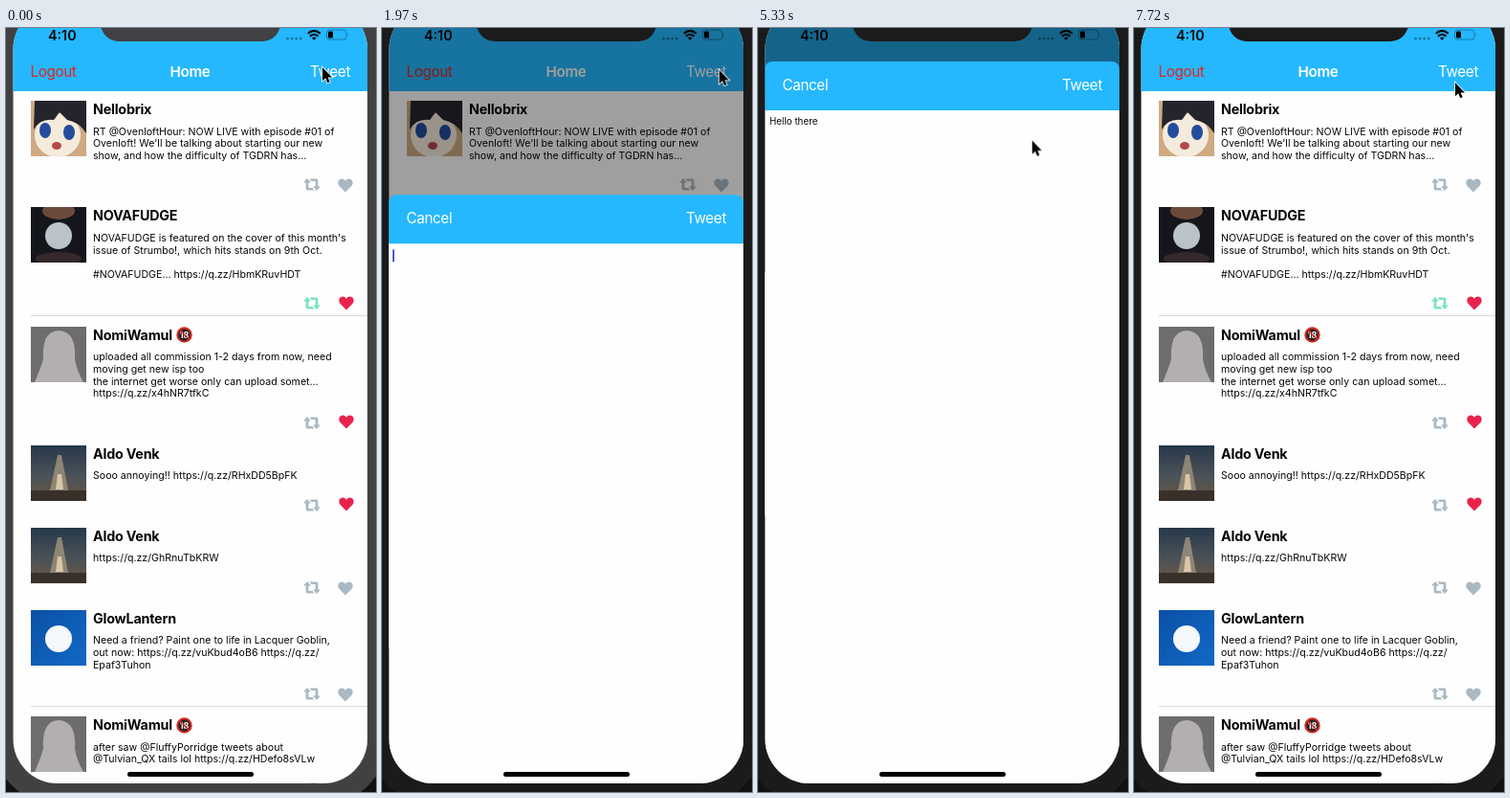
Write an HTML page that moves like this. It is 387 by 798 pixels and loops after 8 s.

```html
<!DOCTYPE html>
<html lang="en">
<head>
<meta charset="utf-8">
<title>Compose flow</title>
<style>
  html, body { margin: 0; width: 100%; height: 100%; overflow: hidden; background: #111; }
  body { position: relative; font-family: Inter, Roboto, sans-serif; color: #060606; }
  div, svg.at { position: absolute; white-space: nowrap; }
  .loop { animation: 8s ease infinite; }
  .hard { animation-timing-function: step-end; }

  .bezel { background: #414143; animation-name: focus; }
  .body { inset: -60px -12px -13px -14px; border-radius: 68px; }
  .notch { left: 99px; top: -30px; width: 188px; height: 43.5px; border-radius: 19px; }
  .screen { inset: 0; background: #fefefe; clip-path: inset(-24px 9px 9px 7.5px round 46px); }
  .indicator { left: 127px; top: 777px; width: 132px; height: 4.5px; border-radius: 3px; background: #000; }

  .bar { left: 7px; right: 9px; background: #25b8ff; }
  .nav { top: 0; height: 66px; }
  .label { font-size: 15.2px; line-height: 20px; letter-spacing: -.35px; color: #fff; }
  .left { left: 25.5px; }
  .right { right: 27px; }
  .title { left: 0; width: 385px; text-align: center; font-weight: 600; }
  .time { left: 44px; top: -2px; font: 600 14.3px/20px Inter, Roboto, sans-serif; }

  .feed { inset: 66px 9px auto 0; }
  .row { left: 0; right: 0; }
  .avatar { left: 25.5px; top: 10px; width: 58px; height: 58px; }
  .name { left: 91px; top: 10px; font-size: 14.3px; line-height: 18px; font-weight: 700; letter-spacing: -.2px; }
  .name svg { width: 17px; height: 17px; vertical-align: -3.5px; margin-left: 1px; }
  .text { left: 91px; top: 36.6px; font-size: 10.6px; line-height: 12.7px; white-space: pre; }
  .share { left: 311px; bottom: 7px; width: 18px; height: 13px; fill: #aab8c2; }
  .heart { left: 347px; bottom: 5px; width: 16px; height: 15px; fill: #aab8c2; }
  .share.on { fill: #7ce2bb; }
  .heart.on { left: 348px; bottom: 6.5px; fill: #e9224c; }
  .line { left: 25.5px; right: 0; bottom: 0; height: 1px; background: #d9d9dc; animation-name: line; }
  .line.faint { background: #ebebec; animation-name: faint; }

  .dim { inset: 0; background: #000; opacity: 0; animation-name: dim; }
  .sheet { inset: 0; transform: translateY(763px); animation-name: sheet; }
  .paper { inset: 60px 9px 0 7px; background: #fefefe; }
  .head { top: 35px; height: 50.5px; border-radius: 8px 8px 0 0; }
  .send { animation-name: press; }
  .typed { left: 12px; top: 91px; font-size: 9.8px; line-height: 14px; white-space: pre; }
  .caret { left: 11px; top: 91.5px; width: 1.8px; height: 13.5px; background: #4162d6; animation-name: blink; }
  .cursor { left: 0; top: 0; width: 14px; height: 20px; overflow: visible; animation: cursor 8s linear infinite; }

  @keyframes focus { 0% { background: #414143 } 14.4%, 100% { background: #1b1b1b } }
  @keyframes sheet {
    0%, 20.06% { transform: translateY(763px) }
    28.94%, 74.5% { transform: none }
    81.62%, 100% { transform: translateY(763px) }
  }
  @keyframes dim { 0%, 20.06% { opacity: 0 } 28.94%, 74.5% { opacity: .46 } 81.62%, 100% { opacity: 0 } }
  @keyframes press { 0% { opacity: 1 } 73.1% { opacity: .75 } 82%, 100% { opacity: 1 } }
  @keyframes blink {
    0% { opacity: 1 } 30.1% { opacity: 0 } 35.7% { opacity: 1 }
    63.2% { opacity: 0 } 69.8% { opacity: 1 } 74.4%, 100% { opacity: 0 }
  }
  @keyframes line { 0% { opacity: 1 } 74.5% { opacity: 0 } 94.3%, 100% { opacity: 1 } }
  @keyframes faint {
    0% { opacity: 0 }
    6.2% { opacity: 1; clip-path: inset(0 82px 0 150px) }
    19.1% { opacity: 1; clip-path: inset(0) }
    74.5%, 100% { opacity: 0 }
  }
  @keyframes cursor {
    0%, .5% { transform: translate(331px, 41px) }
    3% { transform: translate(236px, 170px) }
    5.6% { transform: translate(146px, 337px) }
    8.5% { transform: translate(215px, 190px) }
    11.1%, 12.1% { transform: translate(287px, 78px) }
    16.6%, 19% { transform: translate(341px, 42px) }
    22%, 24% { transform: translate(359px, 38px) }
    29% { transform: translate(310px, 84px) }
    31.2%, 62.5% { transform: translate(251px, 139px) }
    65.2% { transform: translate(258px, 142px) }
    70% { transform: translate(354px, 60px) }
    73.1%, 94% { transform: translate(338px, 57px) }
    96.4%, 100% { transform: translate(336px, 57px) }
  }
</style>
</head>
<body>
<div class="bezel body loop hard"></div>
<div class="screen">
  <div class="feed" id="feed"></div>
  <div class="bar nav"></div>
  <div class="label left" style="top:36px;color:#e8231c">Logout</div>
  <div class="label title" style="top:36px">Home</div>
  <div class="label right" style="top:36px">Tweet</div>
  <div class="time">4:10</div>
  <svg class="at" style="left:290px;top:0" width="72" height="16">
    <g fill="#1879a8"><circle cx="4.5" cy="11" r="1.5"/><circle cx="9" cy="11" r="1.5"/><circle cx="13.6" cy="11" r="1.5"/><circle cx="18.2" cy="11" r="1.5"/></g>
    <g fill="none" stroke="#060606" stroke-width="2.1"><path d="M25.7 5.8Q32.2 0 38.7 5.8M28 8.6Q32.2 4.9 36.4 8.6"/></g>
    <path d="M30 10.4Q32.2 8.7 34.4 10.4L32.2 12.7Z"/>
    <rect x="45.5" y="2" width="20.5" height="10" rx="3" fill="none" stroke="#1879a8"/>
    <path d="M67.3 5.3q1.6 1.7 0 3.4z" fill="#1879a8"/>
    <rect x="47" y="3.5" width="5" height="7" rx="1.3"/>
  </svg>
  <div class="dim loop"></div>
  <div class="sheet loop">
    <div class="paper"></div>
    <div class="bar head"></div>
    <div class="label left" style="top:50px">Cancel</div>
    <div class="label right send loop hard" style="top:50px">Tweet</div>
    <div class="typed" id="typed"></div>
    <div id="caretTrack"><div class="caret loop hard"></div></div>
  </div>
  <div class="indicator"></div>
</div>
<div class="bezel notch loop hard"></div>
<svg class="cursor at" viewBox="0 0 14 20">
  <path d="M0 0V14.2L3.2 11.3L5.3 16.2L7.7 15.2L5.6 10.4H10Z" stroke="#fff" stroke-width="1.6" paint-order="stroke"/>
</svg>

<script>
const LOOP = 8000;

const avatars = {
  pup: `<path fill="#cfa982" d="M0 0H58V58H0Z"/>
    <ellipse cx="28" cy="36" rx="24" ry="23" fill="#f5ebdc"/>
    <path fill="#24242c" d="M4 0H58V34Q50 22 38 20L30 12L24 20Q10 18 3 30Z"/>
    <ellipse cx="15" cy="31" rx="6" ry="8" fill="#234c9c"/><ellipse cx="40" cy="33" rx="6" ry="8" fill="#234c9c"/>
    <ellipse cx="27" cy="47" rx="5" ry="4" fill="#b5484a"/>`,
  band: `<path fill="#15161c" d="M0 0H58V58H0Z"/>
    <ellipse cx="29" cy="4" rx="17" ry="9" fill="#6b4a3c"/><ellipse cx="29" cy="54" rx="24" ry="7" fill="#35282b"/>
    <circle cx="29" cy="30" r="14" fill="#b9c3c9"/>`,
  grey: `<path fill="#6d6d6d" d="M0 0H58V58H0Z"/>
    <path fill="#b3afae" d="M4 58Q10 44 13 34Q11 5 29 4Q48 5 46 34Q48 46 55 58Z"/>`,
  launch: `<path fill="url(#dusk)" d="M0 0H58V58H0Z"/>
    <path fill="#8f8575" d="M28 10H32L39 47H20Z"/><path fill="#d8c7a6" d="M28 30H32L34 46H26Z"/>
    <path fill="#383029" d="M0 47H58V58H0Z"/>`,
  blue: `<path fill="url(#sea)" d="M0 0H58V58H0Z"/><circle cx="29" cy="30" r="14" fill="#f4f8fc"/>`
};

const defs = `<svg width="0" height="0" style="position:absolute"><defs>
  <linearGradient id="dusk" x2="0" y2="1"><stop stop-color="#26384a"/><stop offset=".55" stop-color="#4b5258"/><stop offset="1" stop-color="#6a5743"/></linearGradient>
  <linearGradient id="sea" x2="1" y2="1"><stop stop-color="#0b50a6"/><stop offset="1" stop-color="#1269c6"/></linearGradient>
</defs></svg>`;

const badge = ` <svg viewBox="0 0 17 17"><circle cx="8.5" cy="8.5" r="7.3" fill="#2b2323" stroke="#d92f25" stroke-width="2"/>
  <text x="8.5" y="11.8" font-size="9" font-weight="700" fill="#fff" text-anchor="middle">18</text>
  <path d="M3.3 3.3L13.7 13.7" stroke="#d92f25" stroke-width="1.6"/></svg>`;

const posts = [
  { who: "Nellobrix", pic: "pup", line: "faint",
    text: "RT @OvenloftHour: NOW LIVE with episode #01 of\nOvenloft! We'll be talking about starting our new\nshow, and how the difficulty of TGDRN has…" },
  { who: "NOVAFUDGE", pic: "band", line: "solid", shared: true, liked: true,
    text: "NOVAFUDGE is featured on the cover of this month's\nissue of Strumbo!, which hits stands on 9th Oct.\n\n#NOVAFUDGE… https://q.zz/HbmKRuvHDT" },
  { who: "NomiWamul" + badge, pic: "grey", liked: true,
    text: "uploaded all commission 1-2 days from now, need\nmoving get new isp too\nthe internet get worse only can upload somet…\nhttps://q.zz/x4hNR7tfkC" },
  { who: "Aldo Venk", pic: "launch", liked: true, text: "Sooo annoying!! https://q.zz/RHxDD5BpFK" },
  { who: "Aldo Venk", pic: "launch", text: "https://q.zz/GhRnuTbKRW" },
  { who: "GlowLantern", pic: "blue", line: "solid",
    text: "Need a friend? Paint one to life in Lacquer Goblin,\nout now: https://q.zz/vuKbud4oB6 https://q.zz/\nEpaf3Tuhon" },
  { who: "NomiWamul" + badge, pic: "grey",
    text: "after saw @FluffyPorridge tweets about\n@Tulvian_QX tails lol https://q.zz/HDefo8sVLw" }
];

const arrow = "M4 0 8 4.6H5.4V9.9H9.6L11.4 12.6H4.4Q2.6 12.6 2.6 10.8V4.6H0Z";
const shareIcon = `<path d="${arrow}"/><path d="${arrow}" transform="rotate(180 9 6.5)"/>`;
const heartIcon = `<path d="M8 14.6 1.6 8C-1 5 .5 .8 4 .6 6 .5 7.3 1.6 8 2.8 8.7 1.6 10 .5 12 .6 15.5 .8 17 5 14.4 8Z"/>`;
const on = flag => flag ? " on" : "";

let rowTop = 0;
let html = defs;
for (const p of posts) {
  const height = 73.3 + 12.7 * p.text.split("\n").length;
  html += `<div class="row" style="top:${rowTop}px;height:${height}px">
    <svg class="avatar at" viewBox="0 0 58 58">${avatars[p.pic]}</svg>
    <div class="name">${p.who}</div><div class="text">${p.text}</div>
    <svg class="share at${on(p.shared)}" viewBox="0 0 18 13">${shareIcon}</svg>
    <svg class="heart at${on(p.liked)}" viewBox="0 0 16 15">${heartIcon}</svg>
    ${p.line ? `<div class="line ${p.line} loop hard"></div>` : ""}</div>`;
  rowTop += height;
}
document.getElementById("feed").innerHTML = html;

// Typing: each key reveals a letter and pushes the caret behind it.
const message = "Hello there";
const keyTimes = [2860, 2940, 3120, 3290, 3470, 3920, 4090, 4180, 4360, 4530, 4620];
const clearAt = 7000 / LOOP;
const timing = { duration: LOOP, iterations: Infinity };
const typed = document.getElementById("typed");
typed.innerHTML = [...message].map(c => `<span>${c}</span>`).join("");

const textLeft = typed.getBoundingClientRect().left;
const step = (offset, props) => ({ offset, easing: "step-end", ...props });
const caretPath = [step(0, { transform: "translateX(0)" })];
[...typed.children].forEach((letter, i) => {
  const at = keyTimes[i] / LOOP;
  const x = letter.getBoundingClientRect().right - textLeft;
  letter.animate([step(0, { color: "transparent" }), step(at, { color: "#060606" }),
    step(clearAt, { color: "transparent" }), step(1, { color: "transparent" })], timing);
  caretPath.push(step(at, { transform: `translateX(${x}px)` }));
});
caretPath.push(step(1, { transform: "translateX(0)" }));
document.getElementById("caretTrack").animate(caretPath, timing);
</script>
</body>
</html>
```
